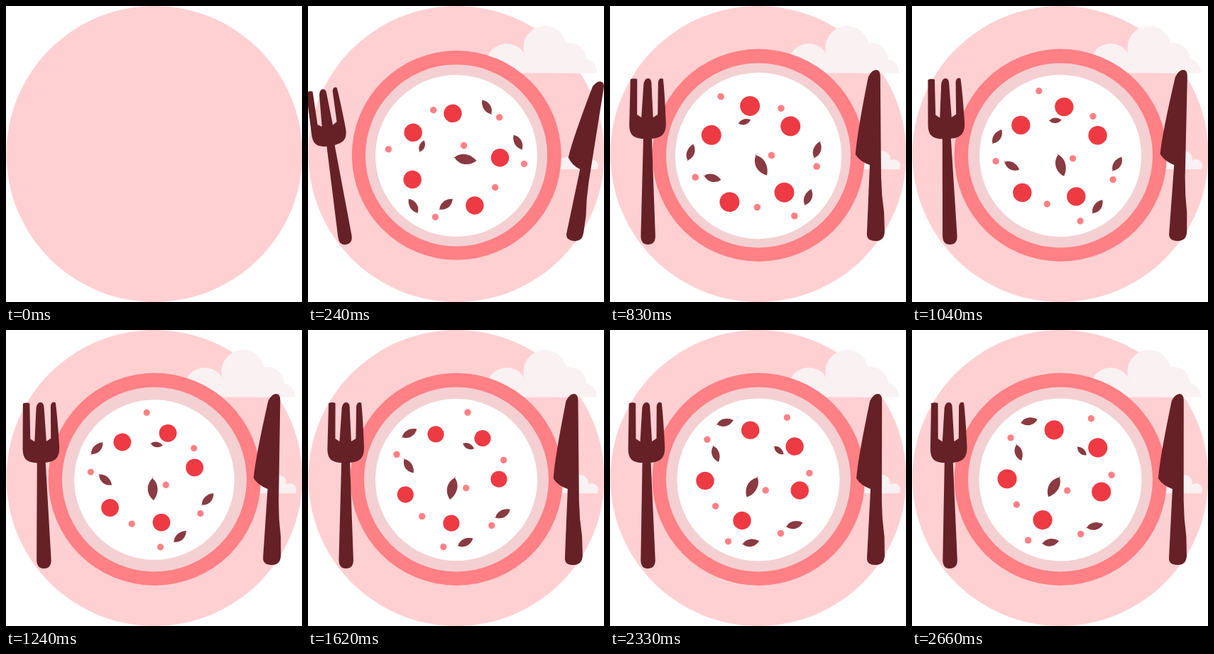
Animation of 417 by 417 pixels, one loop 2.7 s. Source, as an HTML page with a canvas:

```html
<!DOCTYPE html>
<html lang="en">
<head>
<meta charset="utf-8">
<title>Dinner plate</title>
<style>
  html, body { margin: 0; height: 100%; overflow: hidden; background: #fff; }
  canvas { display: block; }
</style>
</head>
<body>
<canvas id="stage"></canvas>
<script>
const SIZE = 417, LOOP = 2700, STEPS = 65;
const canvas = document.getElementById('stage');
const ctx = canvas.getContext('2d');
const ratio = window.devicePixelRatio || 1;
canvas.width = canvas.height = SIZE * ratio;
canvas.style.width = canvas.style.height = SIZE + 'px';

const DARK = '#662126', RED = '#ee3a43', CORAL = '#ff8085', LEAF = '#8a3a41';

const forkShape = new Path2D(
  'M-23 -233Q-18 -235 -13.5 -233L-14 -183L-8 -179L-4.5 -226Q-3 -234 1.5 -234Q6 -234 6.5 -228' +
  'L8.5 -179L15 -183L16 -229Q18 -236 23 -233Q25 -215 26.5 -172C27 -155 20 -150 6.5 -149' +
  'L10.5 -12Q10.5 0 0 0Q-10 0 -10 -12L-5.5 -149C-20 -150 -26 -155 -25 -172Z');
const knifeShape = new Path2D(
  'M-8 -231Q-3 -241 3 -241Q9 -241 9 -232L8.8 -90Q9 -65 12.5 -40L13 -14Q13 0 0 0' +
  'Q-12.5 0 -12 -10L-7 -107Q-21 -112 -27 -122Q-25 -150 -8 -231Z');
const leafShape = new Path2D('M-17 -2L-14 -2C-6 -10 8 -9 17 0C8 9 -6 9 -14 -1Z');

// x, y from the plate centre in the resting pose
const berries = [[-10, -70], [52, -46], [58, 16], [-24, 57], [-75, 0]];
const seeds = [[42, -87], [-71, -58], [72, -8], [10, 15], [30, 76], [-44, 86], [-61, 36]];
// x, y, angle, scale
const leaves = [
  [-46, -81, -16, .75], [-60, -38, 69, .75], [29, -41, 38, .55],
  [-9, 9, 116, 1], [49, 65, -16, .75], [-13, 89, -13, .75]
];

// x, y, radius
const bigCloud = [[280, 82, 29], [334, 58.5, 30.5], [368, 76, 24], [387, 94, 20], [334, 88, 30]];
const smallCloud = [[365, 227, 14], [383, 216, 12], [400, 225, 9], [385, 230, 16]];

// What is left of a cubic ease-out
const remaining = (t, duration) => Math.max(0, 1 - t / duration) ** 3;
const grow = (t, duration) => 1 - remaining(t, duration);
// Fading oscillation that crosses zero at start and every half period
const wobble = (t, start, half, fade) =>
  Math.sin(Math.PI * (t - start) / half) * Math.exp(-((t / fade) ** 2));

function disc(x, y, r, color) {
  ctx.fillStyle = color;
  ctx.beginPath();
  ctx.arc(x, y, r, 0, 2 * Math.PI);
  ctx.fill();
}

function placed(x, y, degrees, scale, draw) {
  ctx.save();
  ctx.translate(x, y);
  ctx.rotate(degrees * Math.PI / 180);
  ctx.scale(scale, scale);
  draw();
  ctx.restore();
}

function shape(path, color, x, y, degrees, scale) {
  placed(x, y, degrees, scale, () => {
    ctx.fillStyle = color;
    ctx.fill(path);
  });
}

function cloud(puffs, x, base, scale) {
  placed(x, base, 0, scale, () => {
    ctx.beginPath();
    ctx.rect(-SIZE, -SIZE, 2 * SIZE, SIZE);
    ctx.clip();
    for (const [px, py, r] of puffs) disc(px - x, py - base, r, '#f9f1f2');
  });
}

function draw(t) {
  ctx.setTransform(ratio, 0, 0, ratio, 0, 0);
  ctx.clearRect(0, 0, SIZE, SIZE);
  disc(209, 208.5, 208.5, '#ffd0d2');

  const puff = grow(t, 200);
  cloud(bigCloud, 330, 94.5, puff);
  cloud(smallCloud, 384, 230, puff);

  const plate = grow(t, 330);
  disc(209.3, 210.3, 149.7 * plate, CORAL);
  disc(209, 210.5, 130 * plate, '#f4d0d2');

  const food = grow(t, 300) * (1 + .063 * wobble(t, 249, 750, 1100));
  const spin = 1.2 - 140.2 * (1 - t / 2900) ** 2.55;
  const berry = 12.6 + 1.1 * Math.cos(2 * Math.PI * (t - 720) / 2100);
  placed(209, 211, spin, food, () => {
    disc(0, 0, 114.5, '#fff');
    for (const [x, y] of berries) disc(x, y, berry, RED);
    for (const [x, y] of seeds) disc(x, y, 4.7, CORAL);
    for (const leaf of leaves) shape(leafShape, LEAF, ...leaf);
  });

  const length = grow(t, 402);
  const swing = 30 * remaining(t, 655) - 2.6 * wobble(t, 380, 500, 1350);
  shape(forkShape, DARK, 53.5, 336, -.9 - .9 * swing, length);
  shape(knifeShape, DARK, 374, 331, swing, length);
}

function tick() {
  const step = LOOP / STEPS;
  const index = Math.floor((performance.now() % LOOP + 9) / step);
  draw(Math.min(index, STEPS - 1) * step);
  requestAnimationFrame(tick);
}
tick();
</script>
</body>
</html>
```
